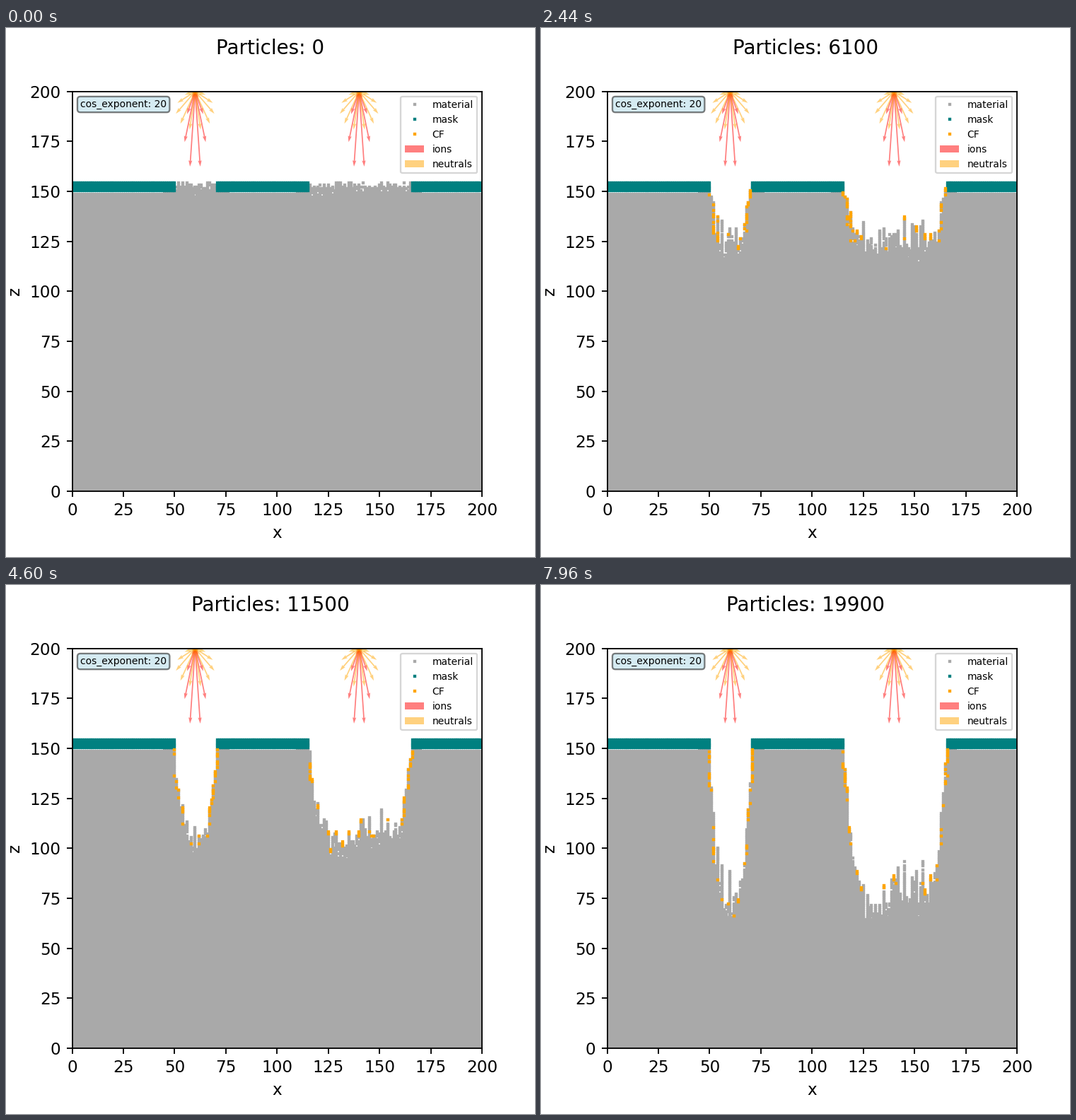
Animation of 748x748 px, one loop 8000 ms. Source, as a matplotlib script:

```python
import numpy as np
import matplotlib.pyplot as plt
from matplotlib.animation import FuncAnimation

FRAMES = 200
NX, NZ = 200, 160
LIFT = .3       # cells are drawn slightly above their integer height
rng = np.random.default_rng(11)


def trench(first, last, depth, wall, sharp, hump):
    """Columns of one trench and their final depth: flat floor, tapered walls."""
    cols = np.arange(first, last + 1)
    u = 2 * (cols - first) / (last - first) - 1
    shape = depth * (1 - wall * np.abs(u) ** sharp)
    shape -= hump * np.exp(-((u - .25) / .35) ** 2)
    return cols, shape + rng.normal(0, 6, len(cols)) * (1 - u ** 4)


narrow_cols, narrow_depth = trench(51, 70, 80, .67, 2.5, 0)
wide_cols, wide_depth = trench(116, 165, 82, .85, 6, 14)
COLS = np.r_[narrow_cols, wide_cols]
DEPTH = np.r_[narrow_depth, wide_depth]
N = len(COLS)

start = 154 - rng.integers(0, 4, N)
power = rng.uniform(.8, 1.0, N)
wobble = rng.uniform(0, 2 * np.pi, N)
top_phase = rng.random(N)
stack = rng.integers(1, 8, N) // 3 + 1
pits = rng.random((N, NZ)) < .06
phase = rng.random((NX, NZ))

x = np.arange(NX)[:, None]
z = np.arange(NZ)[None, :]
is_col = np.isin(x, COLS)
is_mask = ~is_col & (z >= 150) & (z <= 154)
live = (((x >= 45) & (x <= 76)) | ((x >= 110) & (x <= 170))) & (z >= 50)
to_wall = np.min([np.abs(x - edge) for edge in (50.5, 70.5, 115.5, 165.5)], axis=0)
cf_rate = np.where(to_wall < 5, np.where(z > 128, .5, .2), .02)


def heights(i):
    t = i / (FRAMES - 1)
    sway = 3 * (np.sin(wobble + 9 * t) - np.sin(wobble))
    return np.round(np.minimum(start, start - DEPTH * t ** power + sway)).astype(int)


def cells(i):
    """Solid cells and CF-covered cells."""
    h = heights(i)
    top = h[:, None]
    solid = np.repeat(z <= 149, NX, axis=0)
    solid[COLS] = (z <= top) & ~(pits & (z > top - 7))
    gap = ~solid & ~is_mask
    side = solid & (np.roll(gap, 1, axis=0) | np.roll(gap, -1, axis=0))
    grow = min(1, i / 30)
    cf = side & ((phase + i / 110) % 1 < cf_rate * grow)
    on_top = (top_phase + i / 45) % 1 < .2 * grow
    for k in range(3):
        pick = on_top & (stack > k)
        cf[COLS[pick], h[pick] + k] = True
    return solid & live, cf & (z < 152)


fig = plt.figure(figsize=(4.5, 4.5), dpi=748 / 4.5)
ax = fig.add_axes([.125, 93 / 748, .775, .88 - 93 / 748])
title = fig.suptitle("Particles: 0")

# Untouched bulk around and below the trenches
ax.broken_barh([(0, 46), (75, 36), (169, 31)], (0, 149.4), color="darkgray", lw=0)
ax.broken_barh([(0, 200)], (0, 51), color="darkgray", lw=0)


def squares(color, label):
    return ax.plot([], [], "s", ms=1, color=color, label=label)[0]


def place(line, grid):
    cx, cz = np.nonzero(grid)
    line.set_data(cx, cz + LIFT)


material = squares("darkgray", "material")
mask = squares("teal", "mask")
film = squares("orange", "CF")
place(mask, is_mask)


def fan(count, length, exponent, color, label):
    a = np.tile(np.linspace(-np.pi / 2, np.pi / 2, count), 2)
    size = length * np.abs(np.cos(a)) ** exponent
    ax.quiver(np.repeat([60, 140], count), np.full(2 * count, 200),
              size * np.sin(a), -size * np.cos(a), color=color, alpha=.5,
              width=.003, scale=1, scale_units="dots", label=label)


fan(24, 111.5, 20, "red", "ions")
fan(12, 55, 1, "orange", "neutrals")

ax.set(xlim=(0, 200), ylim=(0, 200), xlabel="x", ylabel="z",
       xticks=range(0, 201, 25), yticks=range(0, 201, 25))
ax.text(.02, .98, "cos_exponent: 20", transform=ax.transAxes, fontsize=6, va="top",
        bbox=dict(boxstyle="round", facecolor="lightblue", alpha=.5))
ax.legend(loc="upper right", fontsize=6)


def draw(i):
    solid, cf = cells(i)
    place(material, solid)
    place(film, cf)
    title.set_text(f"Particles: {100 * i}")
    return material, film, title


anim = FuncAnimation(fig, draw, frames=FRAMES, interval=40,
                     init_func=lambda: draw(0), repeat=True, repeat_delay=0)
plt.show()
```
